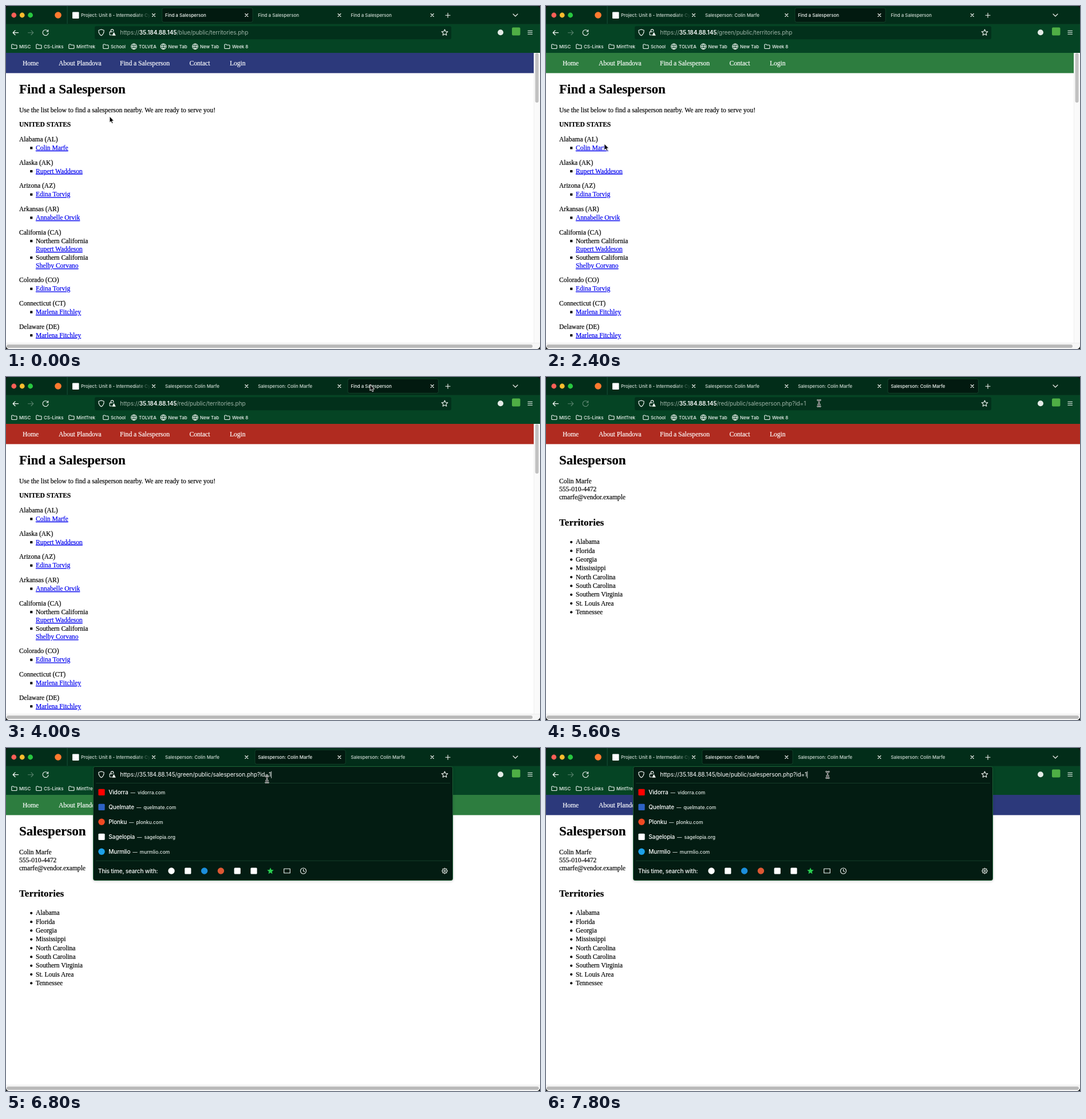
Write an HTML page that moves like this. It is 933 px wide and 600 px high and loops after 8000 ms.

```html
<!DOCTYPE html>
<html lang="en">
<head>
<meta charset="utf-8">
<title>Find a Salesperson</title>
<style>
  html, body { margin: 0; width: 100%; height: 100%; overflow: hidden; background: #101312; }
  svg { display: block; width: 933px; height: 600px; border-radius: 6px; }
  text { white-space: pre; }
  .page { font: 11.54px "Liberation Serif", serif; }
  .page text { fill: #000; stroke: #000; stroke-width: .2px; }
  .page .nav { fill: #fff; stroke: #fff; }
  .page .link { fill: #0000ee; stroke: #0000ee; text-decoration: underline; }
  .h1 { font-size: 23.08px; font-weight: 700; }
  .h2 { font-size: 17.1px; font-weight: 700; }
  .bold { font-weight: 700; }
  .ui { font: 500 7.9px Inter, sans-serif; fill: #f4f8f5; }
  .url { font: 400 10px Inter, sans-serif; letter-spacing: -.06px; fill: #9db3a6; }
  .host { font-weight: 600; fill: #fff; }
  .focused { fill: #fff; }
  .row { font: 500 10px Inter, sans-serif; letter-spacing: -.15px; fill: #fff; }
  .site { font-size: 8.4px; letter-spacing: 0; fill: #e4ece7; }
  .icon { fill: none; stroke: #f4f8f5; stroke-width: 1.1; stroke-linecap: round; stroke-linejoin: round; }
</style>
</head>
<body>
<svg id="stage" viewBox="0 0 933 600">
  <defs>
    <linearGradient id="fade" gradientUnits="userSpaceOnUse" x1="226" y1="0" x2="253" y2="0">
      <stop stop-color="#d3ded7"/><stop offset="1" stop-color="#d3ded7" stop-opacity="0"/>
    </linearGradient>
  </defs>
  <g id="page"></g>
  <g id="chrome"></g>
  <g id="pointer"></g>
</svg>
<script>
const LOOP = 8000, STEP = 200;
const PERSON = 'Colin Marfe';
const SITES = [
  { name: 'blue', color: '#2c397b', loaded: 1000 },
  { name: 'green', color: '#2d7d3f', loaded: 3000 },
  { name: 'red', color: '#b02b20', loaded: 5200 }
];
// [start, selected tab]
const TABS = [[0, 0], [1600, 1], [3800, 2], [6400, 1], [7400, 0]];
// [start, end] of address bar focus
const FOCUS = [[5800, 6400], [6600, 7400], [7600, 8000]];
// [time, x, y]
const PATH = [
  [0, 181, 193], [400, 105, 246], [800, 103, 246], [1000, 203, 180], [1400, 465, 20],
  [1800, 472, 15], [2200, 112, 235], [2400, 102, 241], [2800, 102, 244], [3200, 260, 160],
  [3800, 636, 14], [4000, 636, 13], [4600, 108, 240], [5000, 102, 244], [5600, 477, 46],
  [6000, 478, 46], [6400, 492, 16], [6600, 470, 45], [6800, 456, 55], [7000, 455, 52],
  [7400, 345, 16], [7600, 480, 44], [7800, 492, 47]
];

const text = (x, y, s, cls = '', extra = '') => `<text x="${x}" y="${y}" class="${cls}" ${extra}>${s}</text>`;
const rect = (x, y, w, h, fill, r = 0, extra = '') =>
  `<rect x="${x}" y="${y}" width="${w}" height="${h}" rx="${r}" fill="${fill}" ${extra}/>`;
const dot = (x, y, r, fill) => `<circle cx="${x}" cy="${y}" r="${r}" fill="${fill}"/>`;
const icon = (x, y, d, extra = '') => `<path class="icon" transform="translate(${x} ${y})" d="${d}" ${extra}/>`;
const badge = (x, y, fill, round) => round ? dot(x, y, 5.7, fill) : rect(x - 5.6, y - 5.6, 11.2, 11.2, fill, 1.5);

const CROSS = 'M-2.5-2.5L2.5 2.5M2.5-2.5L-2.5 2.5';
const FOLDER = 'M-4.7-2.8q0-1 1-1h2l1.2 1.3h4q1 0 1 1v4.2q0 1-1 1h-7.2q-1 0-1-1z';
const GLOBE = 'M-4.8 0a4.8 4.8 0 1 0 9.6 0a4.8 4.8 0 1 0-9.6 0zM-4.8 0h9.6M0-4.8q-4.2 4.8 0 9.6M0-4.8q4.2 4.8 0 9.6';
const RELOAD = 'M4.2-2.7A4.9 4.9 0 1 0 4.9.6M4.7-5v3h-3';
const star = (r, inner) => 'M' + Array.from({ length: 10 }, (_, i) => {
  const a = i * Math.PI / 5, d = i % 2 ? inner : r;
  return `${(d * Math.sin(a)).toFixed(2)} ${(-d * Math.cos(a)).toFixed(2)}`;
}).join('L') + 'z';

function territories() {
  const states = [
    ['Alabama (AL)', PERSON], ['Alaska (AK)', 'Rupert Waddeson'], ['Arizona (AZ)', 'Edina Torvig'],
    ['Arkansas (AR)', 'Annabelle Orvik'], ['California (CA)'], ['Colorado (CO)', 'Edina Torvig'],
    ['Connecticut (CT)', 'Marlena Fitchley'], ['Delaware (DE)', 'Marlena Fitchley']
  ];
  const square = y => rect(42.2, y - 5.6, 4.1, 4.1, '#000');
  let y = 236.8;
  let out = text(23, 153, 'Find a Salesperson', 'h1') +
    text(23, 186, 'Use the list below to find a salesperson nearby. We are ready to serve you!') +
    text(23, 211.3, 'UNITED STATES', 'bold');
  for (const [state, rep] of states) {
    out += text(23, y, state) + square(y + 15.1);
    if (rep) {
      out += text(52, y + 15.1, rep, 'link');
      y += 40.7;
    } else {
      out += text(52, y + 15.1, 'Northern California') + text(52, y + 29.4, 'Rupert Waddeson', 'link') +
        square(y + 44.2) + text(52, y + 44.2, 'Southern California') + text(52, y + 58.5, 'Shelby Corvano', 'link');
      y += 83.6;
    }
  }
  return out + rect(922, 82, 11, 508, '#fafafa') + rect(922, 82, .6, 508, '#e6e6e6') +
    rect(924.6, 82.5, 6, 86.5, '#c1c1c1', 3);
}

function salesperson() {
  const areas = ['Alabama', 'Florida', 'Georgia', 'Mississippi', 'North Carolina', 'South Carolina',
    'Southern Virginia', 'St. Louis Area', 'Tennessee'];
  return text(23, 153, 'Salesperson', 'h1') +
    [PERSON, '555-010-4472', 'cmarfe@vendor.example'].map((s, i) => text(23, 186 + i * 13.8, s)).join('') +
    text(23, 260.4, 'Territories', 'h2') +
    areas.map((s, i) => dot(44.2, 288.8 + i * 15.33, 2.1, '#000') + text(52, 292.3 + i * 15.33, s)).join('');
}

function page(site, opened) {
  const width = opened ? 933 : 922;
  const links = [[29, 'Home'], [92, 'About Plandova'], [199, 'Find a Salesperson'], [320.5, 'Contact'], [391, 'Login']];
  return rect(0, 82, 933, 518, '#fff') + '<g class="page">' + rect(0, 82, width, 35.4, site.color) +
    links.map(([x, s]) => text(x, 104, s, 'nav')).join('') +
    (opened ? salesperson() : territories()) + '</g>' +
    rect(0, 589.5, 933, 10.5, '#f6f6f6') + rect(0, 589.5, 933, .6, '#e6e6e6') +
    rect(1, 592.2, opened ? 930 : 919, 5.8, '#b9b9b9', 2.9);
}

function tabStrip(t, selected) {
  let out = rect(0, 0, 933, 31.5, '#022d19') + rect(106.6, 0, 1, 31, '#17523a') +
    ['#ff5f57', '#febc2e', '#28c840'].map((c, i) => dot(13.8 + i * 14.4, 16, 4.4, c)).join('') +
    dot(91, 16, 5.8, '#ff7a2f') + rect(116, 10.5, 11.5, 11.5, '#fff', 1) +
    text(131, 19.3, 'Project: Unit 8 - Intermediate Cy', 'ui', 'style="fill:url(#fade)"') +
    icon(258, 16, CROSS) + icon(772, 16.2, 'M-4 0h8M0-4v8') + icon(890, 16, 'M-4-2L0 2L4-2');
  SITES.forEach((site, i) => {
    const x = 273 + i * 162.2, active = i === selected;
    if (active) out += rect(x - .3, 3.3, 158.4, 25, '#021a10', 3, 'stroke="#17492f" stroke-width=".8"');
    if (t >= site.loaded && t < site.loaded + STEP) out += rect(x, 3.3, 40, 25, '#0d5135', 3);
    const title = t >= site.loaded ? 'Salesperson: ' + PERSON : 'Find a Salesperson';
    out += text(x + 5, 19.3, title, 'ui', active ? '' : 'style="fill:#d3ded7"') + icon(x + 147.3, 16, CROSS);
  });
  return out;
}

function toolbar(t, site) {
  const bookmarks = [[9.5, 'MISC'], [52.5, 'CS-Links'], [109.5, 'MintTrek'], [169.5, 'School'],
    [218.5, 'TOLVEA', 1], [270, 'New Tab', 1], [325.5, 'New Tab', 1], [381.5, 'Week 8']];
  const loading = t >= site.loaded - STEP && t < site.loaded + STEP;
  const dim = t >= site.loaded && t < site.loaded + 4 * STEP ? 'opacity=".4"' : '';
  return rect(0, 31.3, 933, 50.7, '#054424') +
    icon(17, 46.7, 'M4.5 0h-9M-1-3.8L-4.8 0L-1 3.8', 'style="stroke-width:1.3"') +
    icon(43, 46.7, 'M-4.5 0h9M1-3.8L4.8 0L1 3.8', 'opacity=".35"') +
    (loading ? icon(69, 46.7, 'M-4-4L4 4M4-4L-4 4', 'opacity=".5"') : icon(69, 46.7, RELOAD, dim)) +
    rect(155, 35.2, 623, 23, '#02301b', 3) +
    dot(864, 46.3, 5, '#e3ebe6') + rect(884, 37.5, 14.5, 14, '#4fae45', 2) +
    icon(915.7, 46.3, 'M-3.8-3h7.6M-3.8 0h7.6M-3.8 3h7.6') +
    bookmarks.map(([x, s, web]) => icon(x + 5, 70.8, web ? GLOBE : FOLDER) +
      text(x + 13.5, 73.6, s, 'ui')).join('');
}

function dropdown() {
  const sites = [['Vidorra', 'vidorra.com', '#ff0000'], ['Quelmate', 'quelmate.com', '#2d62c4'],
    ['Plonku', 'plonku.com', '#f04a22', 1], ['Sagelopia', 'sagelopia.org', '#fff'],
    ['Murmlio', 'murmlio.com', '#1da1e8', 1]];
  const engines = [['#fff', 1], ['#fff'], ['#1c8edb', 1], ['#de5833', 1], ['#fff'], ['#fff']];
  const gear = Array.from({ length: 8 }, (_, i) => `<path class="icon" d="M0-4v-1" transform="translate(766.5 215) rotate(${i * 45})"/>`).join('');
  return rect(152.5, 32.5, 628, 199, '#031c12', 3, 'stroke="#1c5f35" style="filter:drop-shadow(0 1px 2px #0003)"') +
    rect(157, 61, 619, .7, '#1d4a33') + rect(157, 196.8, 619, .7, '#1d4a33') +
    sites.map(([name, host, color, round], i) => badge(167, 77.3 + i * 26, color, round) +
      text(179.3, 81 + i * 26, `${name}<tspan class="site" dx="4">—</tspan><tspan class="site" dx="4">${host}</tspan>`, 'row')).join('') +
    text(161, 219, 'This time, search with:', 'row') +
    engines.map(([color, round], i) => badge(289 + i * 28.8, 215, color, round)).join('') +
    `<path d="${star(6, 2.7)}" transform="translate(462 215.3)" fill="#2bcf51"/>` +
    icon(491, 215, 'M-5.3-3.7h10.6v7.4h-10.6z') +
    icon(519.5, 215, 'M-5 0a5 5 0 1 0 10 0a5 5 0 1 0-10 0M0-3v3l2 1.2') +
    icon(766.5, 215, 'M-4 0a4 4 0 1 0 8 0a4 4 0 1 0-8 0M-1.5 0a1.5 1.5 0 1 0 3 0a1.5 1.5 0 1 0-3 0') + gear;
}

function address(site, opened, focused) {
  const path = `/${site.name}/public/${opened ? 'salesperson.php?id=1' : 'territories.php'}`;
  const host = '35.184.88.145';
  const url = focused ? 'https://' + host + path : `https://<tspan class="host">${host}</tspan>${path}`;
  return icon(166.5, 46.3, 'M0-5.3L4.6-3.8Q5 2.5 0 5.5Q-5 2.5-4.6-3.8z') +
    icon(185.5, 46, 'M-2.3-1v-1.8a2.3 2.3 0 0 1 4.6 0v1.3M-1 4.7h-2.6q-.8 0-.8-.8v-4q0-.8.8-.8h4') +
    '<path d="M188.5 45.5l3.3 6.2h-6.6z" fill="#f4f8f5"/>' +
    icon(766.5, 46.6, star(5.6, 2.6)) +
    text(199.3, 50.4, url, focused ? 'url focused' : 'url', 'id="url"');
}

function pointer(x, y) {
  const beam = y > 33 && y < 60 && x > 198 && x < 750;
  if (beam) {
    const d = 'M-2.5-5.5Q0-5.5 0-3.8V3.8Q0 5.5-2.5 5.5M2.5-5.5Q0-5.5 0-3.8M0 3.8Q0 5.5 2.5 5.5M-1.5 2h3';
    return icon(x, y, d, 'style="stroke:#fff;stroke-width:2.3"') + icon(x, y, d, 'style="stroke:#111;stroke-width:.9"');
  }
  return `<path transform="translate(${x} ${y})" d="M0 0V11L2.4 8.8L4.1 12.6L6 11.8L4.3 8.1H7.6z" fill="#000" stroke="#fff" stroke-width=".9"/>`;
}

function position(t) {
  const next = PATH.findIndex(p => p[0] > t);
  if (next < 0) return PATH.at(-1).slice(1);
  const a = PATH[next - 1], b = PATH[next];
  const k = (t - a[0]) / (b[0] - a[0]), ease = k * k * (3 - 2 * k);
  return [1, 2].map(i => Math.round(a[i] + (b[i] - a[i]) * ease));
}

const layer = id => document.getElementById(id);

function draw(t) {
  const selected = TABS.findLast(([start]) => start <= t)[1];
  const site = SITES[selected], opened = t >= site.loaded;
  const focused = FOCUS.some(([from, to]) => t >= from && t < to);
  layer('page').innerHTML = page(site, opened);
  layer('chrome').innerHTML = tabStrip(t, selected) + toolbar(t, site) +
    (focused ? dropdown() : '') + address(site, opened, focused);
  if (focused) {
    const end = 199.6 + layer('url').getComputedTextLength();
    layer('chrome').innerHTML += rect(end, 40.8, .8, 12, '#fff');
  }
  layer('pointer').innerHTML = pointer(...position(t));
}

const began = performance.now();
let shown = -1;
function tick() {
  const t = Math.floor((performance.now() - began) % LOOP / STEP) * STEP;
  if (t !== shown) draw(shown = t);
  requestAnimationFrame(tick);
}
tick();
</script>
</body>
</html>
```
